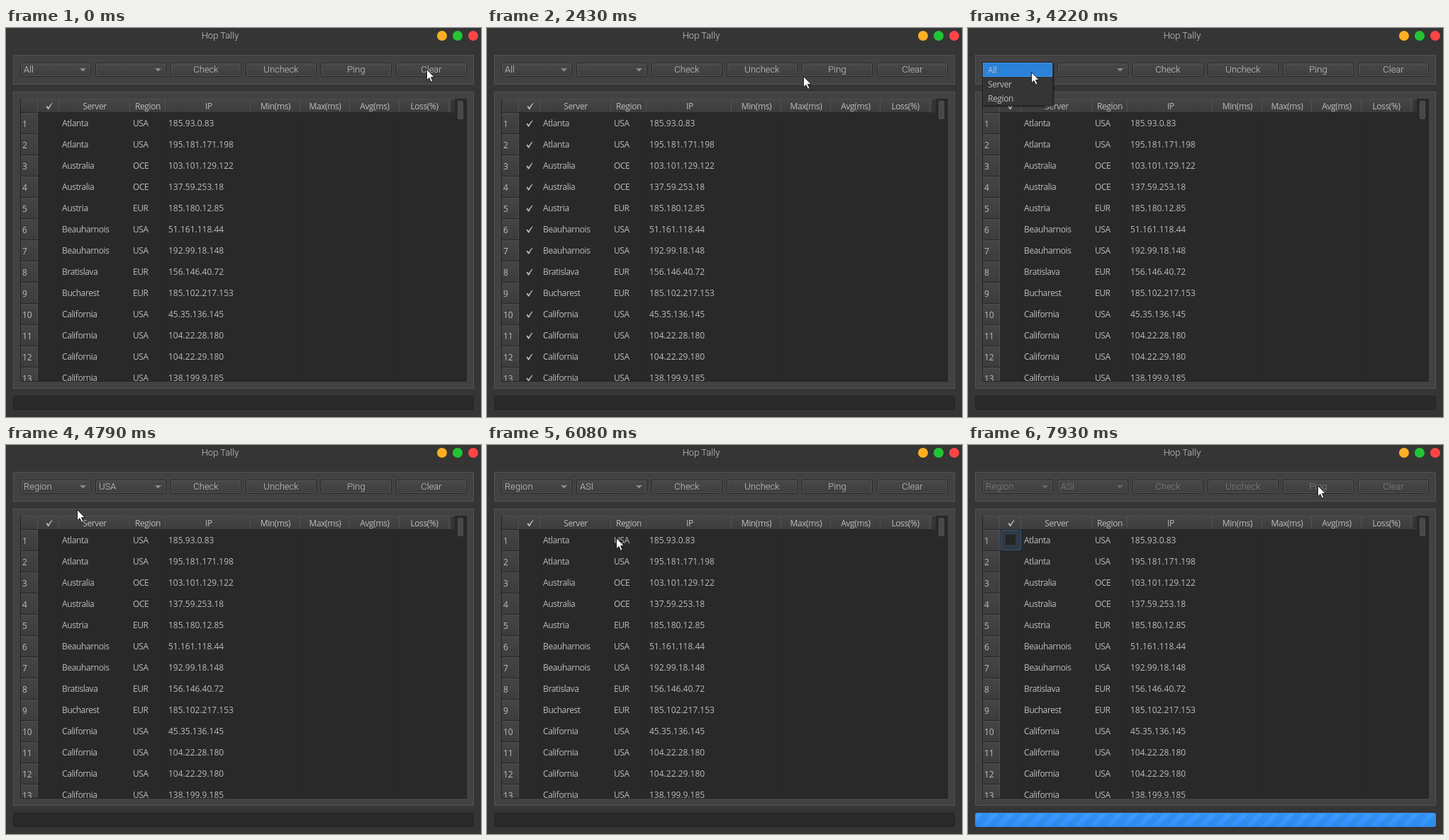
Animation of 670x550 px, one loop 8000 ms. Source, as an HTML page:

```html
<!DOCTYPE html>
<html lang="en">
<head>
<meta charset="utf-8">
<title>Hop Tally</title>
<style>
html, body { margin: 0; width: 100%; height: 100%; overflow: hidden; background: #353535; }
svg { display: block; }
text { font: 12px "Open Sans", "Noto Sans", sans-serif; fill: #bcbcbc; letter-spacing: -.4px; white-space: pre; }
text.num { letter-spacing: 0; }
text.ui { font: 300 13px Roboto, "Liberation Sans", sans-serif; letter-spacing: 0; fill: #cdcdcd; }
.off text.ui { fill: #828282; }
.off .arrow { fill: #696969; }
.arrow { fill: #8c8c8c; }
</style>
</head>
<body>
<svg id="stage" width="670" height="550" viewBox="0 0 670 550">
<defs>
<linearGradient id="face" x2="0" y2="1"><stop stop-color="#484848"/><stop offset="1" stop-color="#3e3e3e"/></linearGradient>
<linearGradient id="head" x2="0" y2="1"><stop stop-color="#454545"/><stop offset="1" stop-color="#3c3c3c"/></linearGradient>
<linearGradient id="blue" x2="0" y2="1"><stop stop-color="#3c9cff"/><stop offset="1" stop-color="#3090fa"/></linearGradient>
<pattern id="stripes" width="22" height="20" patternUnits="userSpaceOnUse">
<path d="M-26 23L-3 -3M-4 23L19 -3M18 23L41 -3" stroke="#2a82da" stroke-opacity=".47" stroke-width="9"/>
</pattern>
<clipPath id="view"><rect x="20" y="100" width="630" height="399"/></clipPath>
<path id="tick" d="M-4.5 .4L-2.9 -.6L-1.3 1.9Q.8 -2 3.9 -4.6L4.6 -4.1Q1.3 0 -.6 4.4H-2Z" fill="#b8b8b8"/>
</defs>
</svg>
<script>
const LOOP = 8000;
const stage = document.getElementById('stage');

function el(tag, attrs, parent = stage) {
  const node = document.createElementNS('http://www.w3.org/2000/svg', tag);
  for (const key in attrs) node.setAttribute(key, attrs[key]);
  parent.appendChild(node);
  return node;
}
const rect = (x, y, width, height, fill, parent, more) =>
  el('rect', { x, y, width, height, fill, ...more }, parent);
const box = (x, y, w, h, fill, stroke, parent, rx = 0) =>
  rect(x + .5, y + .5, w - 1, h - 1, fill, parent, { stroke, rx });
function label(str, x, y, cls, parent, anchor = 'start') {
  const node = el('text', { x, y, class: cls, 'text-anchor': anchor }, parent);
  node.textContent = str;
  return node;
}
const show = (node, on) => node.setAttribute('visibility', on ? 'visible' : 'hidden');

// Window
rect(0, 0, 670, 550, '#353535');
label('Hop Tally', 302, 15, 'ui', stage, 'middle');
[[615, '#ffaf23'], [637, '#22c534'], [659, '#ff4545']].forEach(([cx, fill]) =>
  el('circle', { cx, cy: 11, r: 7, fill }));
box(10, 38, 650, 42, '#424242', '#535353');
box(10, 90, 650, 420, '#424242', '#535353');

// Toolbar
const bar = el('g', {});
function button(x) {
  const face = box(x, 49, 100, 20, 'url(#face)', '#282828', bar, 2);
  el('rect', { x: x + 1.5, y: 50.5, width: 97, height: 17, rx: 1, fill: 'none', stroke: '#fff', 'stroke-opacity': .1 }, bar);
  return face;
}
function combo(x) {
  button(x);
  el('path', { d: `M${x + 84} 57h9l-4.5 4.5z`, class: 'arrow' }, bar);
  return label('', x + 5, 63, 'ui', bar);
}
const kind = combo(20), value = combo(126);
const faces = {};
['Check', 'Uncheck', 'Ping', 'Clear'].forEach((name, i) => {
  const x = 232 + i * 106;
  faces[name] = button(x);
  label(name, x + 50, 63, 'ui', bar, 'middle');
});

// Table
const table = el('g', { 'clip-path': 'url(#view)' });
rect(20, 100, 630, 400, '#292929', table);
rect(20, 101, 613, 19, 'url(#head)', table);
rect(20, 100, 613, 1, '#4c4c4c', table);
rect(20, 119, 613, 1, '#262626', table);
[45, 75, 175, 225, 345, 415, 485, 555, 625].forEach(x => {
  rect(x - 1, 101, 1, 18, '#515151', table);
  rect(x - 1, 120, 1, 379, '#272727', table);
});
[['Server', 125], ['Region', 200], ['IP', 286], ['Min(ms)', 380], ['Max(ms)', 450],
 ['Avg(ms)', 520], ['Loss(%)', 590]].forEach(([s, x]) => label(s, x, 115, '', table, 'middle'));
el('use', { href: '#tick', x: 61, y: 110.5 }, table);

const cell = el('g', {}, table);
box(46, 120, 29, 29, '#303a45', '#2f5377', cell, 1);
box(53, 127, 14, 14, '#252525', '#222', cell);

const ticks = el('g', {}, table);
`Atlanta USA 185.93.0.83
Atlanta USA 195.181.171.198
Australia OCE 103.101.129.122
Australia OCE 137.59.253.18
Austria EUR 185.180.12.85
Beauharnois USA 51.161.118.44
Beauharnois USA 192.99.18.148
Bratislava EUR 156.146.40.72
Bucharest EUR 185.102.217.153
California USA 45.35.136.145
California USA 104.22.28.180
California USA 104.22.29.180
California USA 138.199.9.185`.split('\n').forEach((line, i) => {
  const [server, region, ip] = line.split(' '), y = 120 + i * 30;
  rect(20, y, 25, 30, 'url(#head)', table);
  rect(20, y, 25, 1, '#4e4e4e', table);
  rect(20, y + 29, 25, 1, '#262626', table);
  rect(44, y, 1, 29, '#505050', table);
  label(i + 1, 23, y + 20, 'num', table);
  label(server, 79, y + 19, '', table);
  label(region, 179, y + 19, '', table);
  label(ip, 229, y + 19, 'num', table);
  el('use', { href: '#tick', x: 60, y: y + 15 }, ticks);
});
rect(628, 101, 5, 19, '#343434', table);
box(637, 103, 8, 26, '#484848', '#505050', table, 1);
el('path', { d: 'M20.5 100V499.5H649.5V100', fill: 'none', stroke: '#242424' });

// Progress bar
box(10, 520, 650, 20, '#2a2a2a', '#222', stage, 2);
const busyBar = el('g', {});
box(10, 520, 650, 20, 'url(#blue)', '#3590f2', busyBar, 2);
rect(11, 521, 648, 18, 'url(#stripes)', busyBar);
const stripes = document.getElementById('stripes');

// Drop-down lists
function popup(x, items) {
  const g = el('g', {}), h = items.length * 20 + 2;
  rect(x + 2, 50, 100, h, '#000', g, { opacity: .3 });
  box(x, 48, 100, h, '#353535', '#202020', g);
  const mark = box(x + 1, 49, 98, 20, '#2a82da', '#3d97f2', g);
  items.forEach((s, i) => label(s, x + 8, 64 + i * 20, '', g));
  return (on, y) => {
    show(g, on);
    const i = Math.max(0, Math.min(items.length - 1, Math.floor((y - 49) / 20)));
    mark.setAttribute('y', 49.5 + i * 20);
  };
}
const kindList = popup(20, ['All', 'Server', 'Region']);
const valueList = popup(126, ['USA', 'OCE', 'EUR', 'RUS', 'ASI', 'ME', 'AF', 'SAM']);

const cursor = el('path', {
  d: 'M.5 .5V15.8L4 12.6L6.6 18.3L9 17.2L6.5 11.6H11.2Z',
  fill: '#fff', stroke: '#111', 'stroke-width': .9
});

// Pointer moves: start, last step, number of steps, end x, end y
const moves = [
  [560, 1070, 8, 284, 53], [1360, 1430, 2, 280, 56],
  [2150, 2430, 5, 446, 68], [2500, 2570, 2, 476, 60],
  [2720, 3010, 5, 375, 61], [3210, 3210, 1, 371, 60],
  [3580, 4070, 8, 89, 62],
  [4290, 4360, 2, 88, 95], [4500, 4500, 1, 88, 97],
  [4730, 4940, 4, 165, 60],
  [5300, 5370, 2, 167, 69], [5440, 5790, 6, 178, 136],
  [5940, 6080, 3, 182, 131], [6150, 6290, 3, 282, 60],
  [6650, 6940, 5, 481, 57], [7070, 7290, 4, 493, 57]
];
const presses = [['Check', 1780, 2150], ['Uncheck', 3440, 3580], ['Check', 6500, 6570], ['Ping', 7360, 7500]];
const BUSY = 7500;

function pointer(t) {
  let x = 593, y = 58;
  for (const [start, last, n, ex, ey] of moves) {
    if (t < start) break;
    const step = n > 1 ? (last - start) / (n - 1) : 1;
    const p = Math.min(n, Math.floor((t - start) / step + .1) + 1) / n;
    const e = n > 2 ? p * p * (3 - 2 * p) : p;
    x += (ex - x) * e;
    y += (ey - y) * e;
  }
  return [Math.round(x), Math.round(y)];
}

function draw(t) {
  const [x, y] = pointer(t), within = (a, b) => t >= a && t < b, busy = t >= BUSY;
  cursor.setAttribute('transform', `translate(${x} ${y})`);
  for (const name in faces) {
    const down = presses.some(([n, a, b]) => n === name && within(a, b));
    faces[name].setAttribute('fill', down ? '#303030' : 'url(#face)');
  }
  kind.textContent = t < 4730 ? 'All' : 'Region';
  value.textContent = t < 4730 ? '' : t < 5940 ? 'USA' : 'ASI';
  show(ticks, within(2150, 3580));
  kindList(within(4150, 4730), y);
  valueList(within(5080, 5940), y);
  bar.setAttribute('class', busy ? 'off' : '');
  show(cell, busy);
  show(busyBar, busy);
  const shift = Math.floor(Math.max(0, t - BUSY) / 1000 * 30) % 22;
  stripes.setAttribute('patternTransform', `translate(${shift} 520)`);
}

const began = performance.now();
function tick() {
  draw((performance.now() - began) % LOOP);
  requestAnimationFrame(tick);
}
draw(0);
requestAnimationFrame(tick);
</script>
</body>
</html>
```
